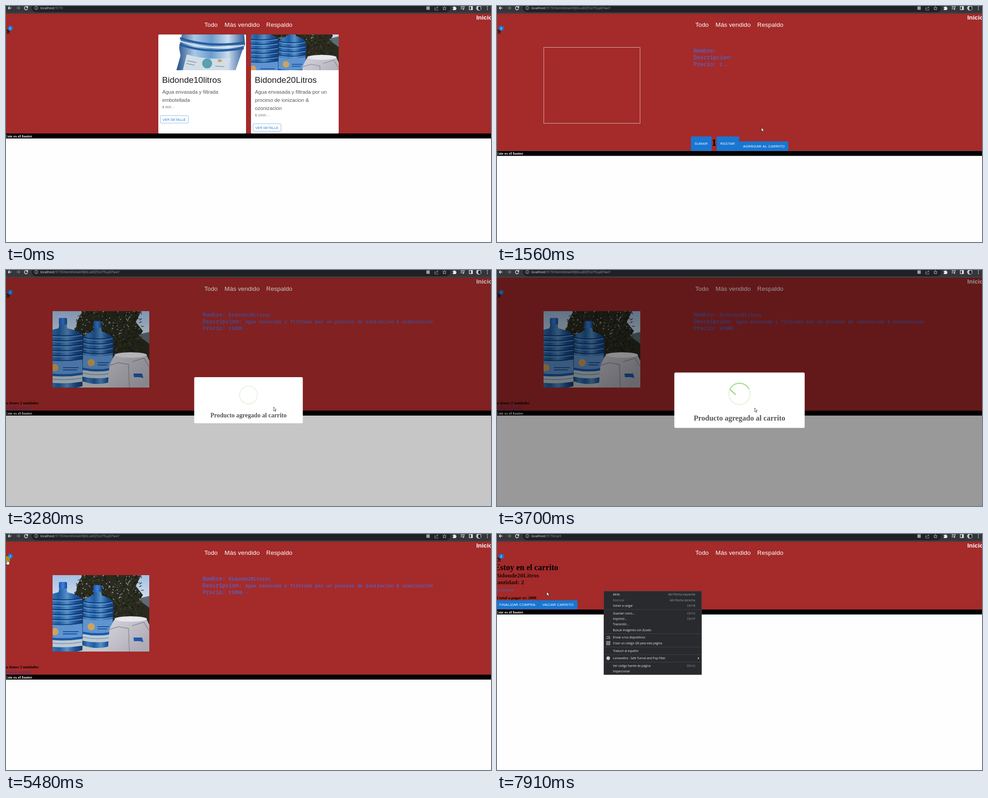
Write an HTML page with a canvas that moves like this. It is 1073 px wide and 522 px high and loops after 7.99 s.

```html
<!DOCTYPE html>
<html lang="es">
<head>
<meta charset="utf-8">
<title>Tienda</title>
<style>
html, body { margin: 0; width: 100%; height: 100%; overflow: hidden; background: #fefefe; }
canvas { display: block; }
</style>
</head>
<body>
<canvas id="stage" width="1073" height="522"></canvas>
<script>
const g = document.getElementById('stage').getContext('2d');
const LOOP = 7990, OPEN = 3249, CLOSE = 4757;
const BLUE = '#1976d2', BLUE_HOVER = '#1565c0', GREEN = '#a5dc86', RED = '#a52a2a', INDIGO = '#5f5bad';

const sans = (px, weight = '') => `${weight} ${px}px "Liberation Sans", Arial, sans-serif`;
const serif = (px, weight = 'bold') => `${weight} ${px}px "Liberation Serif", "Times New Roman", serif`;
const mono = px => `bold ${px}px "Noto Sans Mono", monospace`;
const ui = px => `${px}px "Open Sans", "Noto Sans", sans-serif`;

function text(str, x, y, font, color, align = 'left', spacing = 0) {
  g.font = font;
  g.fillStyle = color;
  g.textAlign = align;
  g.letterSpacing = spacing + 'px';
  g.fillText(str, x, y);
  return g.measureText(str).width;
}
function rect(x, y, w, h, color, r = 0) {
  g.fillStyle = color;
  g.beginPath();
  g.roundRect(x, y, w, h, r);
  g.fill();
}
function disc(x, y, rx, color, ry = rx) {
  g.fillStyle = color;
  g.beginPath();
  g.ellipse(x, y, rx, ry, 0, 0, 7);
  g.fill();
}
function shape(d, fill, stroke, width = 1) {
  const p = new Path2D(d);
  if (fill) { g.fillStyle = fill; g.fill(p); }
  if (stroke) { g.strokeStyle = stroke; g.lineWidth = width; g.stroke(p); }
}
function ramp(x0, y0, x1, y1, ...colors) {
  const grad = g.createLinearGradient(x0, y0, x1, y1);
  colors.forEach((c, i) => grad.addColorStop(i / (colors.length - 1), c));
  return grad;
}

// Cubic-bezier easing solved by bisection
const bezier = (x1, y1, x2, y2) => x => {
  const at = (a, b, s) => 3 * a * s * (1 - s) ** 2 + 3 * b * s * s * (1 - s) + s ** 3;
  let lo = 0, hi = 1;
  for (let i = 0; i < 22; i++) {
    const mid = (lo + hi) / 2;
    if (at(x1, x2, mid) < x) lo = mid; else hi = mid;
  }
  return at(y1, y2, lo);
};
const ease = bezier(.25, .1, .25, 1), easeIn = bezier(.42, 0, 1, 1), smooth = p => p * p * (3 - 2 * p);
const clamp = p => Math.max(0, Math.min(1, p));

// Keys are [time, ...values]; each segment is eased on its own
function track(keys, t, easing) {
  let i = 0;
  while (i < keys.length - 2 && t >= keys[i + 1][0]) i++;
  const [t0, ...a] = keys[i], [t1, ...b] = keys[i + 1];
  const p = easing(clamp((t - t0) / (t1 - t0)));
  return a.map((v, k) => v + (b[k] - v) * p);
}

function toolbar(path) {
  rect(0, 0, 1073, 17, '#35363a');
  rect(0, 15, 1073, 1, '#4b4c50');
  rect(57, -8, 926, 22, '#202124', 10);
  shape('M12 4.5H5M8 1L4.8 4.5L8 8', null, '#e8eaed', 1.3);
  shape('M22 4.5H30M27 1L30.2 4.5L27 8', null, '#85868a', 1.2);
  shape('M47.4 2.6A3.7 3.7 0 1 0 48 5.6M48.2 .5V3.6H45', null, '#e8eaed', 1.4);
  shape('M70.6 4.5A3.6 3.6 0 1 1 63.4 4.5A3.6 3.6 0 1 1 70.6 4.5M67 4V7M67 2.2V3.1', null, '#b5b8bc', .9);
  const w = text('localhost', 76, 7.3, ui(7.4), '#e8eaed');
  text(':5173' + path, 76 + w, 7.3, ui(7.4), '#9aa0a6');
  rect(930, 1, 7.5, 7.5, '#9aa0a6', 1);
  shape('M950 3.5H948.5V9H955.5V6.5M950.5 6.5Q951 3 955.5 3M953.5 .8L956 3L953.5 5.2', null, '#9aa0a6', .9);
  shape('M970 .8L971.2 3.6L974 3.9L971.9 5.8L972.5 8.7L970 7.2L967.5 8.7L968.1 5.8L966 3.9L968.8 3.6Z', null, '#c4c7ca', .9);
  shape('M988.5 2H991A1.3 1.3 0 0 1 993.5 2H995.5V4.2A1.3 1.3 0 0 1 995.5 6.8V9H988.5V6.7A1.2 1.2 0 0 0 988.5 4.3Z', '#e8eaed');
  shape('M1006 1.5H1012M1006 4H1010.5M1006 6.5H1009M1013 7V1.5H1015', null, '#e8eaed', 1.1);
  disc(1011.8, 7, 1.4, '#e8eaed');
  shape('M1025 1.2H1032V8.2H1025Z', null, '#e8eaed', 1.2);
  rect(1029, 1, 3, 7.5, '#e8eaed');
  disc(1046, 4.5, 5.8, '#c3cbd4');
  disc(1047.5, 5, 3, '#20252c', 4);
  [1, 4.5, 8].forEach(y => disc(1065, y, .9, '#e8eaed'));
}

function header(count, bottom) {
  rect(0, 17, 1073, bottom - 17, RED);
  text('Inicio', 1040.5, 30, sans(13.5, 'bold'), '#fff', 'left', .1);
  text('Todo', 438.7, 46, sans(13.5), '#fff', 'left', .1);
  text('Más vendido', 483.6, 46, sans(13.5), '#fff', 'left', .1);
  text('Respaldo', 575.8, 46, sans(13.5), '#fff', 'left', .1);
  shape('M-1 52H1L3.5 57.5H7L8.5 53H1.6M3.5 57.5L2.2 59.3H7.8', '#2a1a1a', '#2a1a1a', .9);
  disc(2.4, 61, 1.1, '#2a1a1a');
  disc(7, 61, 1.1, '#2a1a1a');
  disc(9.5, 49.2, 5.8, BLUE);
  text(count, 9.5, 51.6, sans(6.75), '#fff', 'center');
  rect(0, bottom, 1073, 11, '#000');
  text('Este es el footer', 58, bottom + 8.5, serif(9), '#fff', 'right');
}

function bottle(x, top, w, bottom) {
  const m = x + w / 2, sh = top + 27;
  // Ring that sags across the bottle, y measured from its base
  const band = (from, to, color) => shape(
    `M${x + 2} ${bottom - from}Q${m} ${bottom - from + 7} ${x + w - 2} ${bottom - from}V${bottom - to}Q${m} ${bottom - to + 7} ${x + 2} ${bottom - to}Z`, color);
  rect(m - 9, top, 18, 16, ramp(m - 9, 0, m + 9, 0, '#1c57b0', '#3d80dc', '#164c9c'), 3);
  shape(`M${m - 8} ${top + 15}H${m + 8}L${m + 10} ${sh - 4}Q${x + w} ${sh + 3} ${x + w} ${sh + 18}L${x + w - 2} ${bottom - 6}Q${m} ${bottom + 6} ${x + 2} ${bottom - 6}L${x} ${sh + 18}Q${x} ${sh + 3} ${m - 10} ${sh - 4}Z`,
    ramp(x, 0, x + w, 0, '#123a70', '#3c7cbe', '#1f5ca2', '#5590c6', '#1b549c', '#12386e'));
  for (let up = bottom - sh - 8; up > 66; up -= 11) {
    band(up, up - 2, '#123c78');
    band(up - 3, up - 4.5, '#6ea4d8');
  }
  band(65, 36, '#5e94d0');
  disc(x + w * .3, bottom - 47, 8, '#cfa35c');
  shape(`M${x + w * .5} ${bottom - 47}H${x + w - 10}M${x + w * .5} ${bottom - 42}H${x + w - 14}`, null, '#1d4f9c', 2);
  band(36, 31, '#1c58a8');
  band(31, 16, '#bdcad2');
  band(25, 23, '#7ea0bc');
}

// Outdoor scene, 214 by 169
function scene() {
  rect(0, 0, 214, 169, ramp(0, 0, 0, 70, '#a3c0e4', '#dfe8ee'));
  shape('M0 44L30 40L60 52V110H0ZM180 54L214 46V110H180Z', '#5d6c76');
  shape('M36 62L50 40L56 20L66 0H196L184 24L200 44L192 56L214 72V115H0V66Z', '#2a2b1e');
  let seed = 7;
  const rnd = () => (seed = seed * 16807 % 2147483647) / 2147483647;
  const tones = ['#12140d', '#3b3c2b', '#20231a', '#4c4d3d', '#181a12', '#a9b8c4'];
  for (let i = 0; i < 480; i++) {
    const tone = i % 6, y = rnd() * (tone === 5 ? 55 : 108);
    const x = 60 - y * .3 + rnd() * (136 + y * .35), a = rnd() * 6.3, len = tone === 5 ? 3 : 6;
    shape(`M${x} ${y}l${Math.cos(a) * len} ${Math.sin(a) * len}`, null, tones[tone], 1.4);
  }
  rect(0, 112, 214, 57, '#4c5256');
  rect(50, 155, 75, 14, '#c2c6c8');
  bottle(64, 22, 71, 161);
  bottle(-22, 15, 90, 172);
  shape('M136 99Q172 88 209 99L214 110V169H122L126 119Z', ramp(122, 95, 190, 169, '#d5d4dc', '#aeabb5'));
  disc(173, 97, 36, '#e6e7ec', 6);
  shape('M126 120L146 114L168 118L170 169M176 112L202 104L213 122', null, '#8f8c9a', 1.6);
  shape('M179 138H198L201 148L193 146H180Z', '#1e58ac');
}

function clipped(x, y, w, h, draw) {
  g.save();
  g.beginPath();
  g.rect(x, y, w, h);
  g.clip();
  g.translate(x, y);
  draw();
  g.restore();
}

// Tilted bottle on white, 194 by 79
function closeUp() {
  shape('M52 0H190L192 22L185 38L171 79H40L49 47L46 29Z', ramp(42, 0, 192, 0, '#29548c', '#a9c8e6', '#6a9ccd', '#c9dcee', '#2c5b98'));
  shape('M48 8Q110 30 190 18M47 22Q110 44 189 30', null, '#285e9f', 5);
  shape('M49 15Q110 37 190 24', null, '#dbe8f4', 2.5);
  shape('M63 44Q110 58 160 52L153 79H54Z', '#d2dde6');
  disc(108, 64, 11, '#5aa0ae');
  disc(136, 58, 5, '#c9a45e', 3);
  shape('M64 58L84 62M62 64L80 68M126 70L146 71', null, '#7f94a8', 1.3);
}

function button(label, x, y, w, h, tx, ty, hover) {
  rect(x, y, w, h, hover ? BLUE_HOVER : BLUE, 2);
  text(label, tx, ty, sans(7.875), '#fff', 'left', .2);
}

function card(x, title, lines, price, hover) {
  rect(x, 63, 194, 219, '#fff', 2);
  text(title, x + 8.3, 170, sans(19), '#1c1c1c');
  lines.forEach((line, i) => text(line, x + 8.7, 194 + 18 * i, sans(11.25), '#585858'));
  const y = 190 + 18 * lines.length;
  text(price, x + 8.7, y, sans(7.875), '#707070', 'left', .08);
  if (hover) rect(x + 4.5, y + 16, 62, 17, '#f2f7fc', 2);
  g.strokeStyle = '#8cbae8';
  g.lineWidth = 1;
  g.beginPath();
  g.roundRect(x + 4.5, y + 16.5, 62, 16.5, 2);
  g.stroke();
  text('VER DETALLE', x + 9.5, y + 27.6, sans(7.3), BLUE, 'left', .21);
}

function shopPage(t) {
  toolbar('');
  header('0', 282);
  card(337, 'Bidonde10litros', ['Agua envasada y filtrada', 'embotellada'], '$ 600 .-');
  card(542, 'Bidonde20Litros', ['Agua envasada y filtrada por un', 'proceso de ionizacion &', 'ozonizacion'], '$ 1000 .-', t > 1200);
  clipped(337, 63, 194, 79, closeUp);
  clipped(542, 63, 194, 79, () => { g.translate(0, -37.5); g.scale(.907, .907); scene(); });
}

function detailPage(t) {
  const loaded = t >= 1820, added = t >= 3210;
  toolbar('/itemDetail/WJXLszEQTzoT5Lp87wxY');
  header(added ? '2' : '0', added ? 311 : 320.5);
  if (loaded) clipped(103, 91, 214, 169, scene);
  else {
    g.strokeStyle = '#d6b4b4';
    g.lineWidth = 1;
    g.strokeRect(103.5, 91.5, 213, 168);
  }
  const rows = [
    ['Nombre:', loaded ? 'Bidonde20Litros' : '', 492],
    ['Descripcion:', loaded ? 'Agua envasada y filtrada por un proceso de ionizacion & ozonizacion' : '', 529],
    ['Precio:', loaded ? '$1000.-' : '$.-', 492]];
  rows.forEach(([label, value, x], i) => {
    text(label, 435, 103 + 15.2 * i, mono(12.1), INDIGO);
    text(value, x, 103 + 15.2 * i, mono(10.33), INDIGO);
  });
  if (added) {
    text('Ya tienes 2 unidades', 72, 297, serif(9), '#000', 'right');
    text('Terminar compra', 55, 308, serif(9, ''), '#3436a4', 'right');
  } else {
    button('SUMAR', 429, 288.5, 46, 32, 437, 306.8, t > 2180 && t < 2600);
    text(t < 2400 ? '1' : '2', 480.3, 309, serif(22), '#000', 'center');
    button('RESTAR', 486, 288.5, 50, 32, 494, 306.8);
    button('AGREGAR AL CARRITO', 536, 299.5, 108.5, 21, 544.5, 312.6, t > 2850);
  }
}

function cartPage() {
  toolbar('/cart');
  header('2', 167);
  text('Estoy en el carrito', 135.5, 79.5, serif(18), '#000', 'right');
  text('Bidonde20Litros', 93, 96, serif(13.5), '#1a0808', 'right');
  text('cantidad: 2', 60, 111.3, serif(13.5), '#1a0808', 'right');
  text('ELIMINAR', 38, 127.3, sans(7.875), '#4a66a8', 'right', .2);
  text('El total a pagar es: 2000', 87, 143.8, serif(9), '#000', 'right');
  button('FINALIZAR COMPRA', -4, 146.5, 96, 20, 5, 159.4);
  button('VACIAR CARRITO', 92, 146.5, 86, 20, 100.5, 159.4);
  rect(91.5, 147, .7, 19, '#1560b4');
}

const MENU = [
  [134, 'Atrás', 'Alt+Flecha izquierda'], [146.3, 'Reenviar', 'Alt+Flecha derecha'], [158.8, 'Volver a cargar', 'Ctrl+R'],
  [175.2, 'Guardar como...', 'Ctrl+S'], [187.5, 'Imprimir...', 'Ctrl+P'], [200, 'Transmitir...'], [212.3, 'Buscar imágenes con Zuvelo'],
  [228.8, 'Enviar a tus dispositivos'], [241.4, 'Crear un código QR para esta página'], [258.4, 'Traducir al español'],
  [274.8, 'Lomaveltra - Safe Tunnel and Pop Filter'], [291.3, 'Ver código fuente de página', 'Ctrl+U'], [303.5, 'Inspeccionar']];

function contextMenu(cx, cy) {
  rect(236, 126, 217, 185.5, '#47484b');
  rect(236.7, 126.7, 215.6, 184, '#292a2d');
  for (const [y, label, keys] of MENU) {
    const disabled = label === 'Reenviar';
    if (!disabled && cx > 238 && cx < 452 && Math.abs(cy - y) < 6.2) rect(237, y - 6.2, 215, 12.4, '#3f4043');
    text(label, 256.5, y + 2.3, ui(6.4), disabled ? '#85868a' : '#e8eaed');
    if (keys) text(keys, 438.5, y + 2.3, ui(6.4), '#9a9da1', 'right');
  }
  [166.8, 220.3, 249.8, 266.5, 283].forEach(y => rect(237, y, 215, .8, '#47484b'));
  shape('M243 231V226.5H249M242 231.5H246M247 228H249.5V231.5H247Z', null, '#c4c7ca', .8);
  for (const x of [242.3, 247]) for (const y of [237.5, 242.2]) shape(`M${x} ${y}h3v3h-3Z`, null, '#c4c7ca', 1);
  disc(246, 274.8, 4, '#c4c7ca');
  shape('M444.5 272.8L447.5 274.8L444.5 276.8Z', '#e8eaed');
}

const EM = 9;
function checkLine(left, top, width, angle) {
  if (width <= 0) return;
  g.save();
  g.translate(514 + (left + width / 2) * EM, 251.5 + (top + .156) * EM);
  g.rotate(angle);
  rect(-width * EM / 2, -1.4, width * EM, 2.8, GREEN, 1);
  g.restore();
}

function popup(t) {
  const age = t - OPEN, leaving = t - CLOSE;
  const shade = .4 * (leaving < 0 ? ease(clamp(age / 100)) : 1 - ease(clamp(leaving / 100)));
  rect(0, 17, 1073, 505, `rgba(0,0,0,${shade})`);
  const gone = leaving < 0 ? 0 : ease(clamp(leaving / 150));
  const [scale] = track([[0, .7], [135, 1.05], [240, .95], [300, 1]], age, ease);
  g.save();
  g.globalAlpha = 1 - gone;
  g.translate(536.5, 288);
  g.scale(scale - gone / 2, scale - gone / 2);
  g.translate(-536.5, -288);
  rect(392.3, 226.8, 288.4, 122.4, '#fff', 3);
  text('Producto agregado al carrito', 536.5, 333.3, serif(16.45), '#545454', 'center');

  const ring = (from, to, color) => {
    g.strokeStyle = color;
    g.lineWidth = 2.25;
    g.beginPath();
    g.arc(536.5, 274, 23.6, from * Math.PI / 180, to * Math.PI / 180);
    g.stroke();
  };
  ring(0, 360, '#e4f4db');
  const sweep = 360 * easeIn(clamp((age - 212) / 298));
  if (sweep > 0 && sweep < 360) ring(Math.max(45 - sweep, -150), Math.min(45, 225 - sweep), GREEN);

  const [tipLeft, tipTop, tipWidth] = track([[405, .0625, 1.1875, 0], [525, -.375, 2.1875, 3.125],
    [630, 1.3125, 3, 1.0625], [750, .8125, 2.8125, 1.5625]], age, ease);
  checkLine(tipLeft, tipTop, tipWidth, Math.PI / 4);
  const [right, top, width] = track([[487, 2.875, 3.375, 0], [630, 0, 2.1875, 3.4375], [750, .5, 2.375, 2.9375]], age, ease);
  checkLine(5 - right - width, top, width, -Math.PI / 4);
  g.restore();
}

const POINTER = [
  [150, 1033, 493], [940, 578, 299], [1010, 578, 299], [1300, 585, 269], [1850, 585, 269], [2230, 455, 304], [2560, 455, 304],
  [2950, 590, 308], [3120, 592, 303], [3430, 592, 303], [3690, 570, 305], [4240, 570, 305], [4790, 102, 158],
  [5000, 13, 73], [5350, 3, 57], [5620, 3, 57], [6360, 58, 119], [6490, 58, 119], [6850, 237, 126],
  [6940, 237, 126], [7230, 445, 294], [7300, 445, 294], [7640, 43, 165], [7800, 43, 165], [7905, 110, 128]];
const HAND_TIMES = [[1200, 1440], [2180, 2620], [2850, 3240], [5200, 5640]];

function pointer(t, x, y) {
  g.save();
  g.translate(x, y);
  if (HAND_TIMES.some(([a, b]) => t >= a && t < b))
    shape('M-.9 .7Q0 -.6 .9 .7V4L4.3 5Q5 5.3 4.8 6.6L4 11H-.8L-3.2 7Q-3 5.6 -.9 7Z', '#fff', '#222', .6);
  else
    shape('M0 0V8.6L2 6.8L3.4 10L4.9 9.3L3.5 6.2H6Z', '#fff', '#111', .7);
  g.restore();
}

function draw(t) {
  rect(0, 0, 1073, 522, '#fefefe');
  const [x, y] = track(POINTER, t, smooth);
  if (t < 1440) shopPage(t);
  else if (t < 5640) detailPage(t);
  else cartPage();
  if (t >= OPEN && t < CLOSE + 150) popup(t);
  if (t >= 6900) contextMenu(x, y);
  if (t >= 5400 && t < 5640) disc(1.5, 57, 7.5, 'rgba(190,165,0,.85)');
  if (t >= 150) pointer(t, x, y);
}

function tick() {
  draw(performance.now() % LOOP);
  requestAnimationFrame(tick);
}
tick();
</script>
</body>
</html>
```
